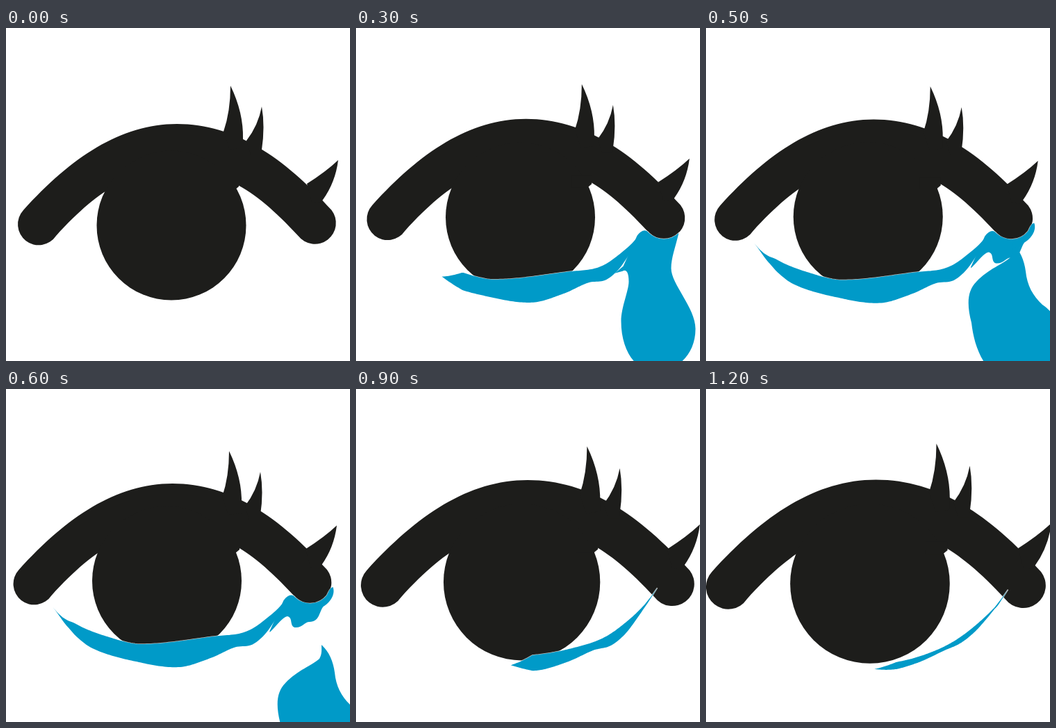
Recreate the animation shown at these times as an HTML page with a canvas. Size 495x479 px, loop 1.3 s.

```html
<!DOCTYPE html>
<html lang="en">
<head>
<meta charset="utf-8">
<title>Crying eye</title>
<style>
html, body { margin: 0; width: 100%; height: 100%; overflow: hidden; background: #fff; }
canvas { display: block; }
</style>
</head>
<body>
<canvas id="stage" width="495" height="479"></canvas>
<script>
const ctx = document.getElementById('stage').getContext('2d');
const INK = '#1d1d1b', WATER = '#009ac8';
const LOOP = 1300, STEP = 100;

const clamp = v => Math.max(0, Math.min(1, v));
const mix = (a, b, k) => a + (b - a) * k;

// Lid and lashes at rest; the top of the lid is at (246, 138)
const lid = new Path2D('M25 262C94 186 165 138 246 138C330 138 400 186 468.5 262' +
  'A30 30 0 0 1 420.5 299C354 226 305 204 246 204C187 204 138 226 72 299A30 30 0 1 1 25 262Z');
const lashes = new Path2D('M323 83Q323 120 313 149L322 175L341 172L341 160Q342 122 323 83Z' +
  'M368 113Q363 140 346 162L352 182L367 182L368 175Q373 142 368 113Z' +
  'M478 190Q460 207 433 224L440 250L452 252L456 247Q474 222 478 190Z');

// Water at the outer corner, measured from the top of the lid
const corner = 'M140 212L160 168C166 160 172 158 177 164A30.7 30.7 0 0 0 ';
const drips = new Path2D(corner + '222 161C225 156 226 150 231 149C235 160 226 172 217 177' +
  'C211 184 212 199 197 199C190 199 187 208 176 207C168 205 174 192 165 191C158 193 152 202 140 214Z');

// Falling drop, tip at (0, 0)
const drop = new Path2D('M0 0C11 10 17 24 19 40C21 60 29 75 43 88C80 110 90 200 0 202' +
  'C-40 190 -55 150 -59 114C-66 87 -65 68 -52 55C-34 36 -14 30 -3 20C1 13 0 7 0 0Z');

// Time, then where the top of the lid sits
const sway = [
  [0, 246, 138], [200, 246, 134.5], [400, 243, 127], [600, 239.5, 136],
  [700, 246, 129], [900, 247, 131], [1200, 244.5, 130.5]
];

function lidTop(t) {
  const i = Math.max(1, sway.findIndex(p => p[0] >= t));
  const a = sway[i - 1], b = sway[i], k = (t - a[0]) / (b[0] - a[0]);
  return [mix(a[1], b[1], k), mix(a[2], b[2], k)];
}

// Smooth y(x) through a few points
function curve(p) {
  const last = p.length - 1;
  const slope = i => {
    const a = p[Math.max(0, i - 1)], b = p[Math.min(last, i + 1)];
    return (b[1] - a[1]) / (b[0] - a[0]);
  };
  return x => {
    let i = 0;
    while (i < last - 1 && x > p[i + 1][0]) i++;
    const [x0, y0] = p[i], [x1, y1] = p[i + 1], w = x1 - x0, k = (x - x0) / w, j = 1 - k;
    return j * j * (1 + 2 * k) * y0 + k * k * (3 - 2 * k) * y1 +
      w * k * j * (j * slope(i) - k * slope(i + 1));
  };
}

const surface = curve([[-172, 178], [-137, 203], [-94, 220], [-45, 231], [63, 219.5],
  [107, 212.5], [144, 187], [166, 164], [178, 148]]);
const bed = curve([[-172, 178], [-152, 206], [-116, 236.5], [-48, 257], [10, 264], [55, 251],
  [90, 235.5], [114, 232], [132, 218], [146, 199], [166, 167], [178, 148]]);
const residue = x => 254 - 0.0032 * x * x;

// Band of water along the lower lid: spreads left, then shrinks and dries
function pool(t) {
  const shrink = 1 - (1 - clamp((t - 600) / 600)) ** 3;
  const dry = 0.78 * Math.sqrt(clamp((t - 700) / 500));
  const left = Math.max(-172, 29 - t / 2) + 170 * shrink;
  const right = dry ? 178 : 166;
  const upper = [], lower = [];
  for (let i = 0; i <= 120; i++) {
    const x = mix(left, right, i / 120);
    const end = clamp((x - 160) / 6);
    const top = mix(surface(x), residue(x), dry * (1 - end));
    const low = mix(bed(x), residue(x), dry * dry * (1 - end));
    const tip = mix(top, low, 0.7), open = clamp((x - left) / 30);
    upper.push([x, mix(tip, top, open)]);
    lower.unshift([x, mix(tip, low, open)]);
  }
  const path = new Path2D();
  for (const p of upper.concat(lower)) path.lineTo(...p);
  path.closePath();
  return path;
}

// Tear hanging from the corner, swelling as g goes from 0 to 1
function stream(g) {
  const rx = mix(213, 275, g), ry = mix(259, 345, g);
  const bx = mix(177, 195, g), by = mix(296.5, 430, g);
  const lx = mix(150, 124, g), ly = mix(262, 320, g);
  const path = new Path2D(corner + '220 164C215 185 209 200 209 215');
  path.bezierCurveTo(209, 238, rx, mix(ry, 215, 0.35), rx, ry);
  path.bezierCurveTo(rx, mix(ry, by, 0.6), mix(bx, rx, 0.55), by, bx, by);
  path.bezierCurveTo(mix(bx, lx, 0.55), by, lx, mix(ly, by, 0.6), lx, ly);
  path.bezierCurveTo(lx, mix(ly, 234, 0.35), 148, 247, 148, 234);
  path.bezierCurveTo(148, 220, 144, 216, 139, 219);
  path.lineTo(128, 222);
  path.closePath();
  return path;
}

function drawEye(t) {
  const k = clamp(t / 400);
  ctx.fillStyle = INK;
  ctx.save();
  ctx.translate(-246, -138);
  ctx.fill(lid);
  ctx.translate(4.5 * k, 9 * Math.sin(Math.PI * t / 1600));
  ctx.fill(lashes);
  ctx.restore();

  ctx.beginPath();
  ctx.arc(-8, 146 - 6 * k, 107.5, 0, Math.PI * 2);
  ctx.fill();

  // Straight cut where pupil and lid meet
  const x = 89 + 7.5 * k, y = 90 + 5 * k;
  ctx.beginPath();
  ctx.moveTo(x, y);
  ctx.lineTo(x - 6, y + 5);
  ctx.lineTo(x - 30, y + 5);
  ctx.lineTo(x - 30, y - 12);
  ctx.lineTo(x, y - 12);
  ctx.fill();
}

function drawWater(t) {
  const parts = [pool(t)];
  if (t >= 200 && t <= 400) parts.push(stream((t - 200) / 200));
  else if (t <= 700) parts.push(drips);
  ctx.strokeStyle = 'rgba(255,255,255,.7)';
  ctx.lineWidth = 1.5;
  ctx.fillStyle = WATER;
  parts.forEach(p => ctx.stroke(p));
  parts.forEach(p => ctx.fill(p));
}

function drawDrop(t) {
  const u = (t - 500) / 100;
  ctx.save();
  ctx.translate(441 + 13 * u, 310 + 37.5 * u + 20.5 * u * u);
  ctx.fillStyle = WATER;
  ctx.fill(drop);
  ctx.restore();
}

function draw(t) {
  ctx.fillStyle = '#fff';
  ctx.fillRect(0, 0, 495, 479);
  const scale = 1 + 0.068 * Math.sqrt(clamp((t - 600) / 600));
  ctx.save();
  ctx.translate(...lidTop(t));
  ctx.scale(scale, scale);
  drawEye(t);
  if (t > 0) drawWater(t);
  ctx.restore();
  if (t >= 500) drawDrop(t);
}

const start = performance.now();
function tick() {
  const t = (performance.now() - start) % LOOP;
  draw(Math.floor(t / STEP) * STEP);
  requestAnimationFrame(tick);
}
tick();
</script>
</body>
</html>
```
